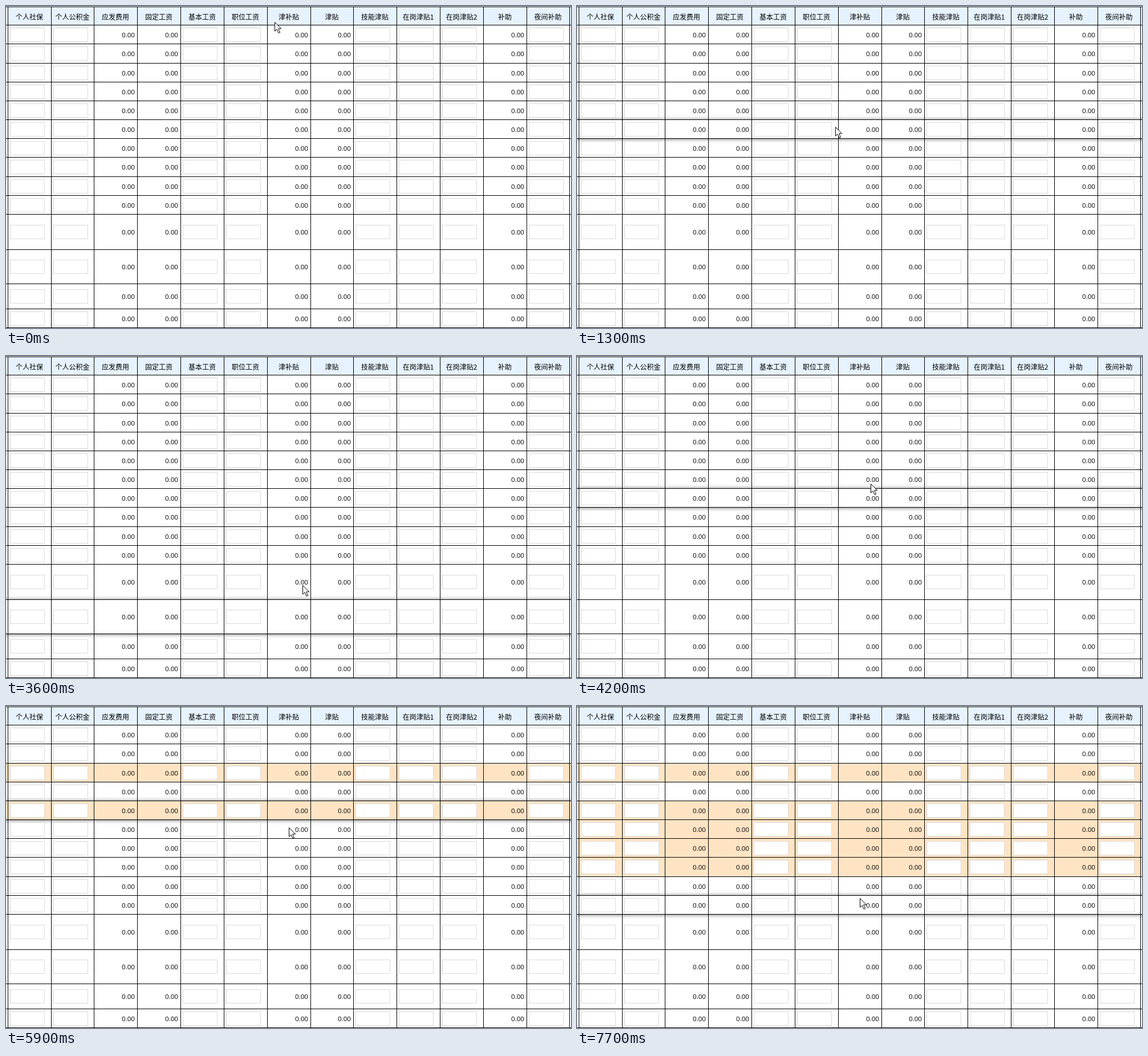
Animation, 991 px wide and 565 px high, one loop 8000 ms. Source, as an HTML page:

```html
<!DOCTYPE html>
<html lang="zh-CN">
<head>
<meta charset="utf-8">
<title>工资表</title>
<style>
  html, body { margin: 0; width: 100%; height: 100%; overflow: hidden; background: #fff; }
  #stage { position: relative; width: 991px; height: 565px; overflow: hidden; color: #000; }
  #stage div, #cursor { position: absolute; box-sizing: border-box; }
  .row { left: -12px; width: 1015px; }
  .header { background: #e6f2fd; }
  .hover { box-shadow: 0 1px 7px rgba(0, 0, 0, .65); }
  .picked { background: #ffe4c4; }
  .line { background: #000; }
  .field { width: 61px; height: 25px; border: 1px solid #dadada; background: #fff; }
  .title { font: 12px/20px "Noto Sans CJK SC", "Noto Sans CJK", sans-serif; text-align: center; white-space: nowrap; }
  .amount { font: 500 11.6px/20px "Open Sans", "Noto Sans", sans-serif; text-align: right; }
  #cursor { left: 0; top: 0; overflow: visible; }
</style>
</head>
<body>
<div id="stage"></div>
<script>
const LOOP = 8000, STEP = 100, HOVER_LAG = 80, GLIDE = 200, CLICK_DELAY = 200, STOP_X = 496;
const titles = ['个人社保', '个人公积金', '应发费用', '固定工资', '基本工资', '职位工资', '津补贴',
  '津贴', '技能津贴', '在岗津贴1', '在岗津贴2', '补助', '夜间补助'];
const computed = /应发|固定|^津|^补助/;
const colX = Array.from({ length: titles.length + 1 }, (_, i) => Math.floor(3.2 + 75.83 * i));
const evenRows = Array.from({ length: 11 }, (_, i) => Math.round(33.2 + 33.17 * i));
const rowY = [1, ...evenRows, 427, 487, 531, 564];

// Free sweep over the table: time, x, y
const sweep = [
  [0, 471, 28], [1300, 453, 212], [1800, 456, 265], [2500, 466, 378],
  [3200, 483, 529], [3600, 520, 402], [3900, 531, 312], [4550, STOP_X, 122]
];
// Stops on single rows: arrival time, y. Each row but the last is clicked.
const stops = [[5000, 122], [5500, 180], [6000, 245], [6800, 219], [7200, 280], [7600, 337]];

const glides = stops.flatMap(([time, y], i) =>
  [[time - GLIDE, STOP_X, stops[Math.max(0, i - 1)][1]], [time, STOP_X, y]]);
const path = [...sweep, ...glides, [LOOP, ...glides.at(-1).slice(1)]];
const clicks = stops.slice(0, -1).map(([time, y]) => ({ time: time + CLICK_DELAY, row: rowAt(y) }));

function rowAt(y) {
  return rowY.findLastIndex(top => top <= y);
}

const stage = document.getElementById('stage');

function add(className, box, text = '') {
  const el = document.createElement('div');
  el.className = className;
  el.textContent = text;
  for (const side in box) el.style[side] = box[side] + 'px';
  return stage.appendChild(el);
}

const rows = rowY.slice(0, -1).map((top, r) =>
  add(r ? 'row' : 'row header', { top, height: rowY[r + 1] - top }));

rows.forEach((_, r) => {
  const middle = (rowY[r] + rowY[r + 1]) / 2;
  titles.forEach((title, c) => {
    const left = colX[c], width = colX[c + 1] - left;
    if (!r) add('title', { left, width, top: 9 }, title);
    else if (computed.test(title)) add('amount', { left, width: width - 4, top: Math.round(middle - 9) }, '0.00');
    else add('field', { left: left + 4, top: Math.round(middle - 12) });
  });
});

rowY.forEach(top => add('line', { left: 0, top, width: 991, height: 1 }));
colX.forEach(left => add('line', { left, top: 1, width: 1, height: 564 }));

stage.insertAdjacentHTML('beforeend', `<svg id="cursor" width="12" height="21">
  <path d="M.5.5V16.2L4.1 12.8 7 19.4 9.5 18.4 6.7 11.8H11.6Z" fill="#fff" stroke="#000"/></svg>`);
const cursor = document.getElementById('cursor');

function pointerAt(t) {
  const i = Math.max(1, path.findIndex(p => p[0] >= t));
  const [t0, x0, y0] = path[i - 1], [t1, x1, y1] = path[i];
  const k = Math.max(0, (t - t0) / (t1 - t0));
  return [x0 + (x1 - x0) * k, y0 + (y1 - y0) * k];
}

function draw(now) {
  const t = Math.floor((now % LOOP) / STEP) * STEP;
  const [x, y] = pointerAt(t);
  const hovered = rowAt(pointerAt(t - HOVER_LAG)[1]);
  cursor.style.transform = `translate(${Math.round(x)}px, ${Math.round(y)}px)`;
  rows.forEach((row, r) => {
    row.classList.toggle('hover', r > 0 && r === hovered);
    row.classList.toggle('picked', clicks.some(click => click.row === r && t >= click.time));
  });
}

const start = performance.now();
function tick() {
  draw(performance.now() - start);
  requestAnimationFrame(tick);
}
tick();
</script>
</body>
</html>
```
